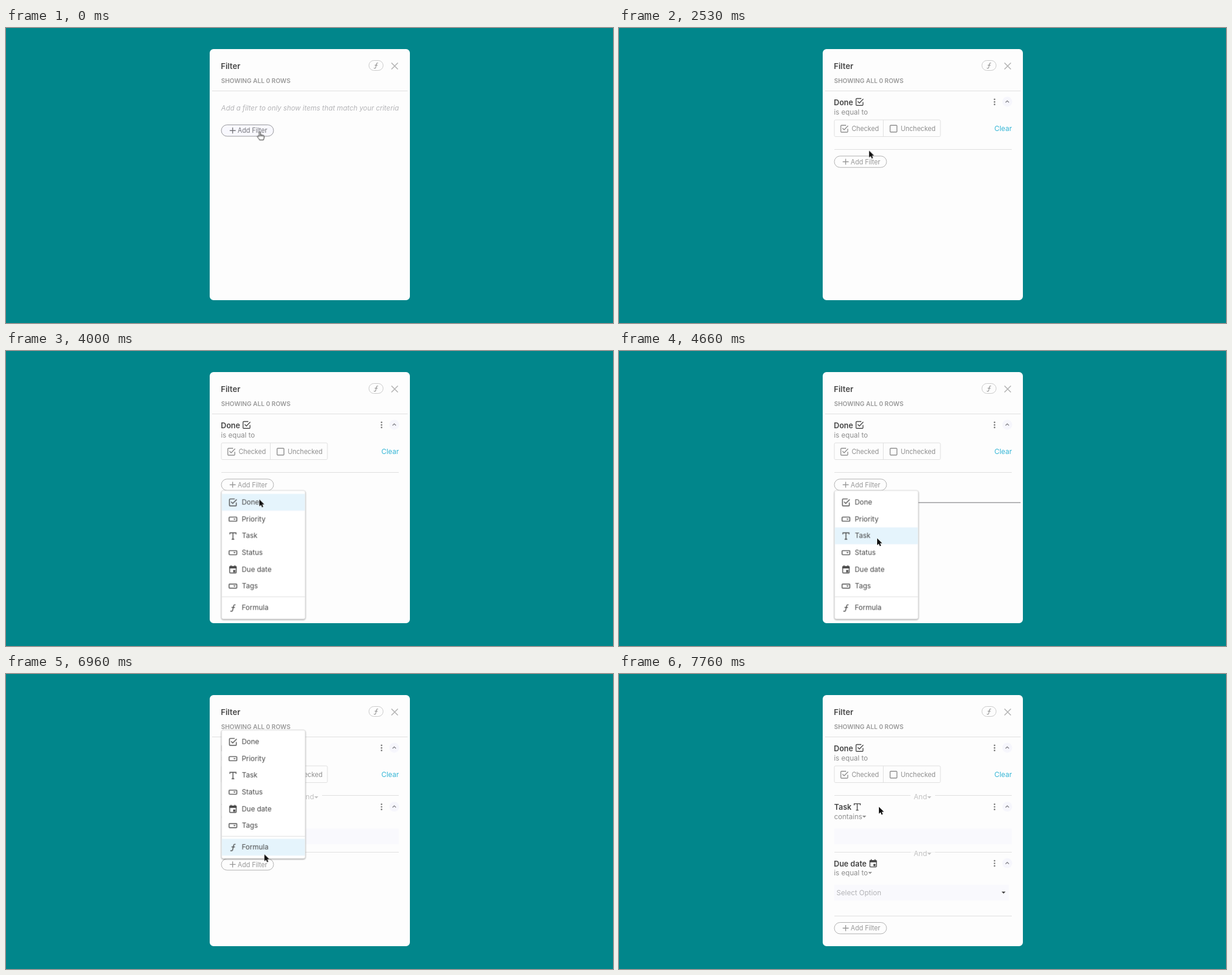
Recreate the animation shown at these times as an HTML page. Size 1037x504 px, loop 8 s.

```html
<!DOCTYPE html>
<html lang="en">
<head>
<meta charset="utf-8">
<title>Filter panel</title>
<style>
html, body { margin: 0; width: 100%; height: 100%; overflow: hidden; background: #01868b; }
svg { display: block; width: 100%; height: 100%; }
text { font: 12px Inter, sans-serif; fill: currentColor; white-space: pre; }
.title { font-size: 13.6px; font-weight: 600; }
.name { font-size: 13px; font-weight: 600; color: #444; }
.caps { font-size: 10.5px; font-weight: 600; color: #999; }
.hint { font-size: 11.8px; font-style: italic; color: #b5b5b8; }
.small { font-size: 11.1px; }
.dark { color: #484848; }
.grey { color: #8e8e8e; }
.pale { color: #c2c2c2; }
.line { stroke: #dfdfdf; }
.field { fill: #f9f9fd; }
.icon { fill: none; stroke: currentColor; stroke-width: 1.4; }
.solid { fill: currentColor; stroke: none; }
.box { fill: #fff; stroke: #d9d9d9; stroke-width: .8; filter: drop-shadow(0 1px 1.2px rgba(0,0,0,.4)); }
.hl { fill: #e5f4fc; }

/* one shared 8 s clock */
.a { animation: 8s step-end infinite; }
.empty { animation-name: empty; }
.first { animation-name: first; }
.second { animation-name: second; }
.third { animation-name: third; }
.flash { animation-name: flash; }
.caret { animation-name: caret; }
.slot { animation-name: slot; }
.hover { animation-name: hover; }
.hand { animation-name: hand; }
.arrow { animation-name: arrow; }
.h1 { animation-name: h1; }
.h2 { animation-name: h2; }
.h3 { animation-name: h3; }
.cursor { animation: cursor 8s linear infinite; }
.m1 { animation: m1 8s ease-out infinite; }
.m2 { animation: m2 8s ease-out infinite; }
.m3 { animation: m3 8s ease-out infinite; transform-origin: 0 219.5px; }

@keyframes empty { 0% { opacity: 1 } 24.125%, 100% { opacity: 0 } }
@keyframes first { 0% { opacity: 0 } 24.125%, 100% { opacity: 1 } }
@keyframes second { 0% { opacity: 0 } 58.69%, 100% { opacity: 1 } }
@keyframes third { 0% { opacity: 0 } 97%, 100% { opacity: 1 } }
@keyframes flash { 0% { opacity: 0 } 58.25% { opacity: 1 } 58.69%, 100% { opacity: 0 } }
@keyframes caret {
  0% { opacity: 0 } 58.69% { opacity: 1 } 65% { opacity: 0 }
  71.625% { opacity: 1 } 77.5%, 100% { opacity: 0 }
}
@keyframes slot {
  0% { transform: translateY(175.2px) }
  24.125% { transform: translateY(228.5px) }
  58.69% { transform: translateY(325.4px) }
  97%, 100% { transform: translateY(434.2px) }
}
@keyframes hover {
  0%, 33.75%, 75.75% { color: #74747a; fill: #f8f8fe }
  16.2%, 48.5%, 86.25%, 100% { color: #979797; fill: #fdfdfd }
}
@keyframes hand {
  0%, 33.75%, 75.75% { opacity: 1 }
  14.9%, 47.8%, 86.2%, 100% { opacity: 0 }
}
@keyframes arrow {
  0%, 33.75%, 75.75% { opacity: 0 }
  14.9%, 47.8%, 86.2%, 100% { opacity: 1 }
}
@keyframes cursor {
  0% { transform: translate(433.5px, 177.3px) }
  14.59% { transform: translate(433.5px, 177.3px); animation-timing-function: ease-in-out }
  19.5%, 31.25% { transform: translate(427px, 208px) }
  36.25%, 47.46% { transform: translate(429.5px, 228px) }
  56.63%, 85.84% { transform: translate(441px, 320px) }
  95%, 100% { transform: translate(444px, 227px) }
}
@keyframes m1 {
  0%, 7.84% { opacity: 0; transform: scale(.4) }
  9.71% { opacity: 1; transform: scale(1.008) }
  11.63% { opacity: 1; transform: scale(1); animation-timing-function: step-end }
  24.125%, 100% { opacity: 0; transform: scale(.4) }
}
@keyframes m2 {
  0%, 39.09% { opacity: 0; transform: scale(.4) }
  41% { opacity: 1; transform: scale(1.008) }
  42.88% { opacity: 1; transform: scale(1); animation-timing-function: step-end }
  58.69%, 100% { opacity: 0; transform: scale(.4) }
}
@keyframes m3 {
  0%, 77.09% { opacity: 0; transform: scale(.4) }
  78.5% { opacity: 1; transform: scale(1.008) }
  79.5% { opacity: 1; transform: scale(1); animation-timing-function: step-end }
  97%, 100% { opacity: 0; transform: scale(.4) }
}
@keyframes h1 { 0% { opacity: 0 } 16.8%, 100% { opacity: 1; transform: translateY(5.7px) } }
@keyframes h2 {
  0% { opacity: 0 }
  48.9% { opacity: 1; transform: translateY(5.7px) }
  51.8% { opacity: 1; transform: translateY(34.3px) }
  54.7%, 100% { opacity: 1; transform: translateY(63px) }
}
@keyframes h3 {
  0% { opacity: 0 }
  86.8% { opacity: 1; transform: translateY(185.8px) }
  89.6% { opacity: 0 }
  90.5% { opacity: 1; transform: translateY(149px) }
  93.4%, 100% { opacity: 1; transform: translateY(120.3px) }
}
</style>
</head>
<body>
<svg viewBox="0 0 1037 504">
  <defs>
    <g id="check" class="icon">
      <path d="M5.8 .2V4.8a1.2 1.2 0 0 1-1.2 1.2H-4.8a1.2 1.2 0 0 1-1.2-1.2V-4.6a1.2 1.2 0 0 1 1.2-1.2H3M-3.2-1L-.4 1.9L6.4-5"/>
    </g>
    <g id="square" class="icon"><rect x="-5.8" y="-5.8" width="11.6" height="11.6" rx="1"/></g>
    <g id="option" class="icon">
      <rect x="-6.6" y="-3.4" width="13.2" height="7" rx="1"/>
      <path class="solid" d="M.6-.9H4.6L2.6 1.3Z"/>
    </g>
    <g id="letter" class="icon"><path d="M-5.2-2.6V-5.2H5.2V-2.6M0-5.2V5.8M-2.2 5.8H2.2"/></g>
    <g id="date" class="icon">
      <rect x="-5.6" y="-4.8" width="11.2" height="11" rx="1"/>
      <path class="solid" d="M-6-5H6V-1.6H-6ZM-4-6.8H-2.4V-4H-4ZM2.4-6.8H4V-4H2.4ZM.4 1.2H4V4.8H.4Z"/>
    </g>
    <g id="func" class="icon">
      <path d="M4.4-5.2C2-6.2 1.2-4.6 .8-2.2L-.4 3.6C-.9 5.8-2.2 6.2-4.4 5.2M-2.6-1H3.4"/>
    </g>
    <path id="drop" class="solid" d="M-3.4-1.6H3.4L0 1.8Z"/>

    <g id="tools">
      <g fill="#7c7c7c"><circle cy="-4.4" r="1.35"/><circle r="1.35"/><circle cy="4.4" r="1.35"/></g>
      <circle cx="21.7" cy="-.3" r="8.4" fill="#f6f6fc"/>
      <path d="M18.8 1L21.7-1.8L24.6 1" fill="none" stroke="#85858c" stroke-width="1.3"/>
    </g>

    <g id="join" class="pale">
      <rect x="498" y="-4" width="42" height="4" fill="#fdfdfd"/>
      <text x="503.6" y="6.4">And</text>
      <use href="#drop" x="530.2" y="2.6"/>
    </g>

    <g id="add">
      <rect x="367.9" y="-9.7" width="89.2" height="19.4" rx="9.7" stroke="currentColor" stroke-opacity=".75"/>
      <path class="icon" d="M382.2 0H392.4M387.3-5.1V5.1"/>
      <text class="small" x="395.8" y="4.1">Add Filter</text>
    </g>

    <rect id="sheet" class="box" width="143" height="219.5" rx="3"/>
    <g id="items" class="dark">
      <use href="#check" x="19.5" y="20.2"/><text x="34.4" y="24.2">Done</text>
      <use href="#option" x="19.5" y="48.8"/><text x="34.4" y="52.8">Priority</text>
      <use href="#letter" x="19.5" y="77.4"/><text x="34.8" y="81.4">Task</text>
      <use href="#option" x="19.5" y="106"/><text x="34.6" y="110.1">Status</text>
      <use href="#date" x="19.5" y="134.6"/><text x="34.4" y="138.7">Due date</text>
      <use href="#option" x="19.5" y="163.2"/><text x="34.8" y="167.4">Tags</text>
      <path class="line" d="M.5 181.5H142.5"/>
      <use href="#func" x="19.5" y="200.6"/><text x="34.4" y="204.4">Formula</text>
    </g>
  </defs>

  <rect width="1037" height="504" fill="#01868b"/>
  <rect x="348" y="36" width="342" height="429" rx="6.5" fill="#fdfdfd"/>

  <!-- header -->
  <text class="title dark" x="367" y="69.8">Filter</text>
  <text class="caps" x="367.4" y="94.3">SHOWING ALL 0 ROWS</text>
  <rect x="620" y="55.5" width="24.3" height="17" rx="8.5" fill="none" stroke="#cacaca"/>
  <use href="#func" class="grey" transform="translate(632 64.3) scale(.82)"/>
  <path d="M658.5 59.5L669.5 70.5M669.5 59.5L658.5 70.5" stroke="#b2b2b2" stroke-width="1.5"/>
  <path class="line" d="M352 107.5H686"/>

  <g class="a empty"><text class="hint" x="367.6" y="140.6">Add a filter to only show items that match your criteria</text></g>

  <g class="a first">
    <text class="name" x="367" y="131.6">Done</text>
    <use href="#check" class="dark" x="411" y="126.3"/>
    <text class="grey" x="367.2" y="147.5">is equal to</text>
    <use href="#tools" x="641.6" y="126.3"/>
    <rect class="line" x="367.9" y="157" width="181.2" height="28.5" rx="2" fill="none"/>
    <path class="line" d="M451.5 157V185.5"/>
    <g class="grey">
      <use href="#check" x="385" y="172"/><text class="small" x="397.4" y="176.1">Checked</text>
      <use href="#square" x="469" y="172"/><text class="small" x="481.2" y="176.1">Unchecked</text>
    </g>
    <text x="641.2" y="176.3" style="color:#35b6d6">Clear</text>
    <path class="line" d="M368 207.5H671"/>
  </g>

  <path class="a flash" d="M511 259H686" stroke="#b4b4b6" stroke-width="2"/>

  <g class="a second">
    <use href="#join" y="208"/>
    <text class="name" x="367.6" y="231.8">Task</text>
    <use href="#letter" class="dark" x="407" y="226.8"/>
    <g class="grey"><text x="367.4" y="247.8">contains</text><use href="#drop" x="419" y="243.6"/></g>
    <use href="#tools" x="641.6" y="227"/>
    <rect class="field" x="367.5" y="264" width="303.5" height="27"/>
    <path class="line" d="M368 304.5H671"/>
  </g>
  <rect class="a caret" x="373.5" y="269.5" width="1" height="14.5" fill="#555"/>

  <g class="a third">
    <use href="#join" y="304.6"/>
    <text class="name" x="367" y="328.6">Due date</text>
    <use href="#date" class="dark" x="434.2" y="323.4"/>
    <g class="grey"><text x="367.2" y="344">is equal to</text><use href="#drop" x="429" y="339.8"/></g>
    <use href="#tools" x="641.6" y="323.5"/>
    <rect class="field" x="367.5" y="360" width="298.5" height="27"/>
    <text x="371.6" y="377.6" style="color:#b3b3b6">Select Option</text>
    <use href="#drop" x="657" y="373.4" style="color:#444"/>
    <path class="line" d="M368 413.5H671"/>
  </g>

  <g class="a slot"><g class="a hover"><use href="#add"/></g></g>

  <!-- menus -->
  <g transform="translate(368.2 185.2)"><g class="m1">
    <use href="#sheet"/><rect class="hl a h1" x=".6" width="141.8" height="28.6"/><use href="#items"/>
  </g></g>
  <g transform="translate(368.2 238.4)"><g class="m2">
    <use href="#sheet"/><rect class="hl a h2" x=".6" width="141.8" height="28.6"/><use href="#items"/>
  </g></g>
  <g transform="translate(368.2 95.7)"><g class="m3">
    <use href="#sheet"/><rect class="hl a h3" x=".6" width="141.8" height="28.6"/><use href="#items"/>
  </g></g>

  <g class="cursor">
    <path class="a arrow" d="M0 0V11.8L2.8 9.2L4.7 13.5L6.7 12.6L4.9 8.5H8.6Z" fill="#111" stroke="#fff" stroke-width=".9" paint-order="stroke"/>
    <path class="a hand" d="M-1 8V1.2C-1-.2 1.3-.2 1.3 1.2V5.5C1.6 4.6 3.3 4.8 3.4 5.8C3.9 5.1 5.4 5.3 5.5 6.4C6.2 5.9 7.5 6.3 7.5 7.4V10C7.5 11.5 6.5 12.2 6.3 14H-.5C-.9 12-3 10.6-4 8.6C-4.5 7.2-3 6.6-2 7.6ZM1.3 5.5V8M3.4 5.8V8M5.5 6.4V8.2" fill="#fff" stroke="#222" stroke-linejoin="round"/>
  </g>
</svg>
</body>
</html>
```
